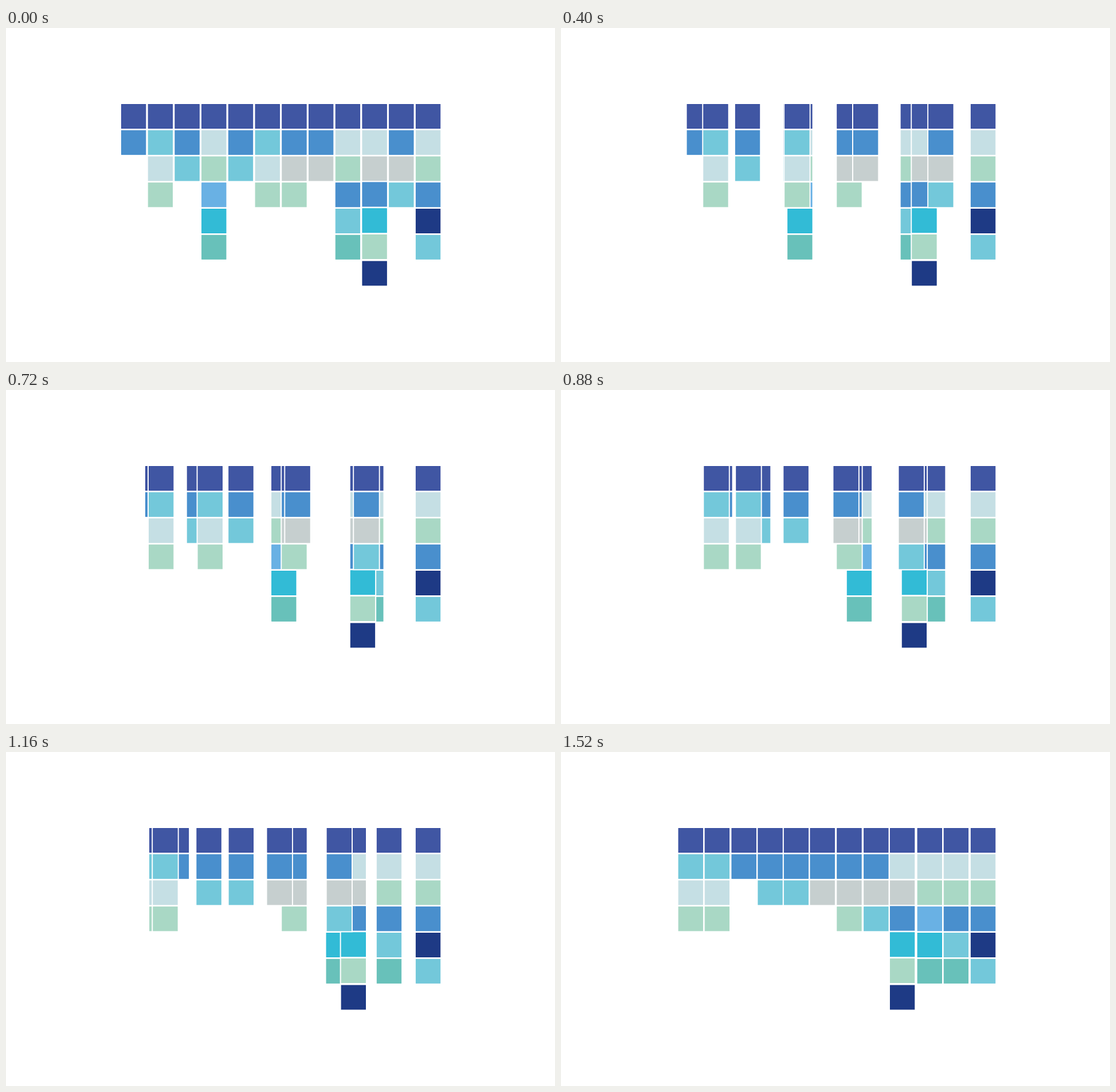
Recreate the animation shown at these times as an HTML page. Size 958 px wide and 584 px high, loop 1.6 s.

```html
<!DOCTYPE html>
<html lang="en">
<head>
<meta charset="utf-8">
<title>Sorting columns</title>
<style>
  @property --p {
    syntax: "<number>";
    inherits: true;
    initial-value: 0;
  }
  html, body {
    margin: 0;
    width: 100%;
    height: 100%;
    overflow: hidden;
    background: #fff;
  }
  svg {
    display: block;
    width: 958px;
    height: 584px;
    animation: sort 1600ms infinite;
  }
  g { transform: translateX(calc(var(--p) * var(--d) * 1px)); }

  /* One shared progress, advancing every 40 ms */
  @keyframes sort {
    0%    { --p: 0;    animation-timing-function: steps(3); }
    7.5%  { --p: .022; animation-timing-function: steps(3); }
    15%   { --p: .08;  animation-timing-function: steps(3); }
    22.5% { --p: .163; animation-timing-function: steps(4); }
    32.5% { --p: .282; animation-timing-function: steps(5); }
    45%   { --p: .435; animation-timing-function: steps(8); }
    65%   { --p: .689; animation-timing-function: steps(7); }
    82.5% { --p: .89;  animation-timing-function: steps(3); }
    90%   { --p: .958; animation-timing-function: steps(2); }
    95%, 100% { --p: 1; }
  }
</style>
</head>
<body>
<svg id="stage" viewBox="0 0 958 584"></svg>
<script>
  const NS = 'http://www.w3.org/2000/svg';
  const LEFT = 201, TOP = 133, STEP_X = 46.72, STEP_Y = 45.75;
  const W = 43.3, H = 43, RIM = 2;

  // letter: [fill, edge]
  const COLORS = {
    d: ['#4056a3', '#30469d'],
    b: ['#498fcd', '#3d88cb'],
    t: ['#73c8da', '#6dc6d9'],
    p: ['#c5dfe4', '#c5dfe4'],
    y: ['#c6cfcf', '#c6cfcf'],
    g: ['#a9d8c5', '#a9d8c5'],
    l: ['#69b1e4', '#62ade3'],
    c: ['#32bbd6', '#24b6d4'],
    e: ['#68c1ba', '#62beb7'],
    n: ['#1e3a85', '#12307f']
  };

  // [tiles from top to bottom, horizontal travel, lift of the middle rows]
  const COLUMNS = [
    ['db', 96.5], ['dtpg', 3], ['dbt', 49], ['dpglce', 280.5],
    ['dbt', 1], ['dtpg', -230], ['dbyg', 0], ['dby', -93.5],
    ['dpgbte', 93], ['dpybcgn', -47.5, 0.8], ['dbyt', -140], ['dpgbnt', 0]
  ];

  function add(parent, tag, attrs) {
    const el = document.createElementNS(NS, tag);
    for (const key in attrs) el.setAttribute(key, attrs[key]);
    return parent.appendChild(el);
  }

  function addTile(col, x, y, [fill, stroke]) {
    add(col, 'rect', {
      x: x - RIM, y: y - RIM, width: W + 2 * RIM, height: H + 2 * RIM, fill: '#fff'
    });
    add(col, 'rect', {
      x: x + 0.5, y: y + 0.5, width: W - 1, height: H - 1, fill, stroke
    });
  }

  const stage = document.getElementById('stage');
  COLUMNS.forEach(([tiles, travel, lift = 0], i) => {
    const col = add(stage, 'g', { style: `--d: ${travel}` });
    [...tiles].forEach((tile, row) => {
      const up = row > 2 && row < 6 ? lift : 0;
      addTile(col, LEFT + i * STEP_X, TOP + row * STEP_Y - up, COLORS[tile]);
    });
  });
</script>
</body>
</html>
```
